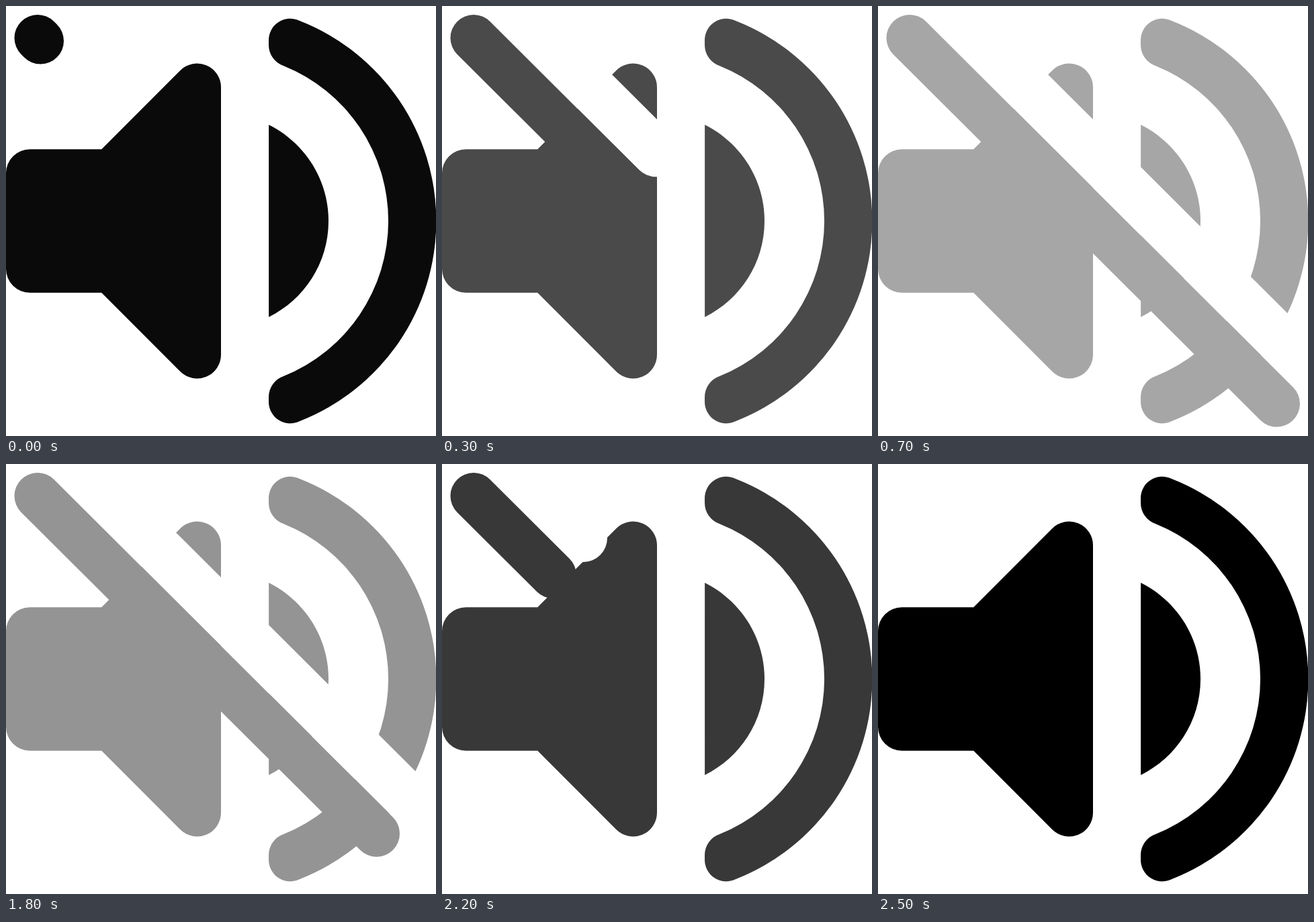
Write an HTML page that moves like this. It is 640 by 640 pixels and loops after 3.3 s.

```html
<!DOCTYPE html>
<html lang="en">
<head>
<meta charset="utf-8">
<title>Mute toggle</title>
<style>
  html, body { margin: 0; height: 100%; overflow: hidden; background: #fff; }
  svg { display: block; width: 100vw; height: 100vh; }
  line { stroke-linecap: round; }
</style>
</head>
<body>
<svg id="icon" viewBox="0 0 640 640">
  <!-- speaker -->
  <path d="M35.5 213.3H142.2L259.3 96A35.55 35.55 0 0 1 320 121.1V518.9A35.55 35.55 0 0 1 259.3 544L142.2 426.7H35.5A35.55 35.55 0 0 1 0 391.1V248.9A35.55 35.55 0 0 1 35.5 213.3Z"/>
  <!-- inner wave -->
  <path d="M480 320c0-62.9-36.3-117-88.9-143.3v286.2c52.6-26 88.9-80 88.9-142.9Z"/>
  <!-- outer wave -->
  <path d="M413 89A249 249 0 0 1 413 551A33 33 0 0 0 391 582V589A32 32 0 0 0 437 618A320 320 0 0 0 437 22A32 32 0 0 0 391 51V58A33 33 0 0 0 413 89Z"/>
  <g id="slash">
    <line id="gap" x1="91.5" y1="-8" stroke="#fff" stroke-width="72"/>
    <line id="bar" x1="47" y1="47.5" stroke-width="69"/>
  </g>
</svg>
<script>
const LOOP = 3300, STEP = 100;
const START = { x: 47, y: 47.5 }, SLOPE = 0.9963;
const [icon, slash, gap, bar] = ['icon', 'slash', 'gap', 'bar'].map(id => document.getElementById(id));

// Slash tip x and grey level for a given step of the loop
function pose(step) {
  if (step < 18) {
    const p = Math.min(1, step / 7) ** 1.05;
    return { tip: 51.5 + 542 * p, grey: 10 + 156 * p };
  }
  const back = step - 18;
  return { tip: 551.5 - 96.5 * back, grey: Math.max(0, 148 - 23 * back) };
}

function setEnd(line, x, y) {
  line.setAttribute('x2', x);
  line.setAttribute('y2', y);
}

function draw(now) {
  const { tip, grey } = pose(Math.floor(now % LOOP / STEP));
  const y = START.y + (tip - START.x) * SLOPE;
  const level = Math.round(grey);
  const color = `rgb(${level},${level},${level})`;
  icon.setAttribute('fill', color);
  bar.setAttribute('stroke', color);
  slash.setAttribute('visibility', tip < START.x ? 'hidden' : 'visible');
  setEnd(bar, tip, y);
  setEnd(gap, tip + 44.5, y - 55.5);
}

const begin = performance.now();
function tick() {
  draw(performance.now() - begin);
  requestAnimationFrame(tick);
}
tick();
</script>
</body>
</html>
```
